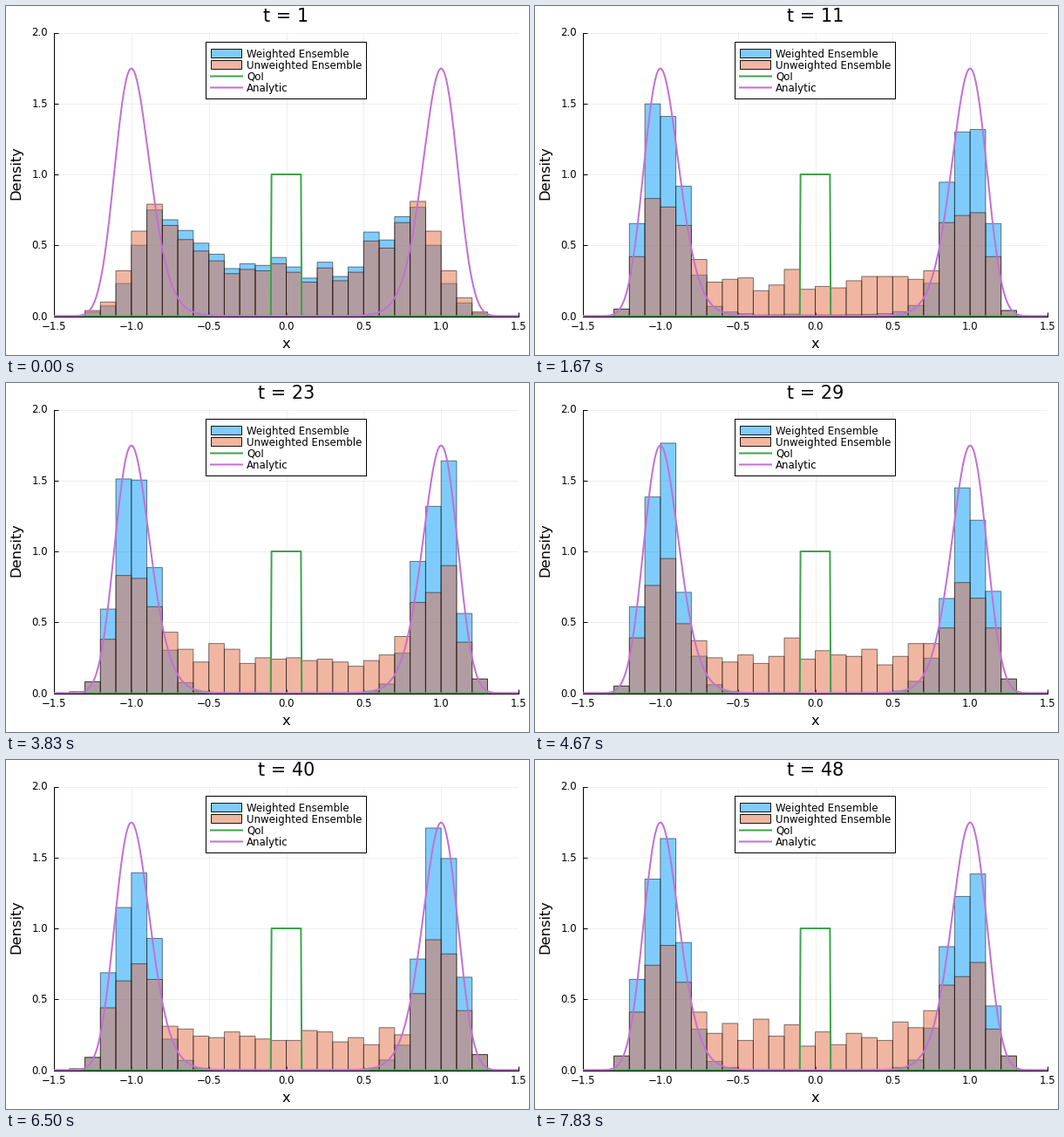
Animation of 600 by 400 pixels, one loop 8000 ms. Source, as a matplotlib script:

```python
import numpy as np
import matplotlib.pyplot as plt
from matplotlib.animation import FuncAnimation
from matplotlib.patches import Rectangle
from matplotlib.lines import Line2D

W, H, DPI = 600, 400, 72          # at 72 dpi one point is one pixel
LEFT, RIGHT, TOP, BOTTOM = 55, 588, 30.5, 355.5
STEPS, STEP_MS = 48, 166.58
RELAX = 2.9                       # steps for the start shape to fade by 1/e
BLUE, ORANGE, GREEN, PURPLE = "#009afa", "#e36f47", "#3da44d", "#c271d2"

plt.rcParams["font.family"] = "DejaVu Sans"


def boltzmann(x):
    return np.exp(-10 * (x**2 - 1)**2)


xs = np.linspace(-1.5, 1.5, 1201)
density = boltzmann(xs) / (boltzmann(xs).sum() * (xs[1] - xs[0]))

BIN = 0.1
edges = np.arange(-14, 14) * BIN
mids = edges + BIN / 2
dist = abs(mids)

# broad cloud at the start; walkers near the centre carry more weight
start_u = np.interp(dist, [.35, .55, .85, .95, 1.05, 1.15, 1.25, 1.35],
                    [.31, .44, .72, .68, .40, .10, .03, 0])
start_w = start_u * np.interp(dist, [.7, 1.05], [1.12, .72])

# long-time shape: the analytic density, or half of it plus a plateau
fine = edges[:, None] + BIN * (np.arange(10) + 0.5) / 10
steady_w = np.interp(fine, xs, density).mean(axis=1)
steady_u = steady_w / 2 + np.interp(dist, [.75, .95, 1.15, 1.35], [.25, .06, .09, .003])


def heights(t):
    """Weighted and unweighted bar heights at step t, from 1000 walkers."""
    fade = np.exp(-(t - 1) / RELAX)
    mean_u = fade * start_u + (1 - fade) * steady_u
    mean_w = fade * start_w + (1 - fade) * steady_w
    u = np.random.default_rng(t).poisson(100 * mean_u) / 100
    return mean_w * u / mean_u.clip(1e-9), u


fig = plt.figure(figsize=(W / DPI, H / DPI), dpi=DPI, facecolor="white")
ax = fig.add_axes([LEFT / W, 1 - BOTTOM / H, (RIGHT - LEFT) / W, (BOTTOM - TOP) / H])
ax.set(xlim=(-1.5, 1.5), ylim=(0, 2))


def label(x, y, text, size, va="baseline", **kw):
    return fig.text(x / W, 1 - y / H, text, fontsize=size, va=va, **kw)


def bars(color, z):
    return ax.bar(edges, np.zeros(len(edges)), BIN, align="edge", zorder=z, snap=False,
                  facecolor=(color, 0.5), edgecolor=(0, 0, 0, 0.5), linewidth=1)


def box(x, y, w, h, **kw):
    fig.add_artist(Rectangle((x, H - y - h), w, h, transform=None, lw=1,
                             snap=False, **kw))


# axes
ticks_x, ticks_y = np.linspace(-1.5, 1.5, 7), np.linspace(0, 2, 5)
ax.set_xticks(ticks_x, [])
ax.set_yticks(ticks_y, [])
ax.set_axisbelow(True)
ax.grid(color="black", alpha=0.1, linewidth=0.6)
ax.tick_params(direction="in", length=5, width=1)
ax.spines[["top", "right"]].set_visible(False)
ax.spines[["left", "bottom"]].set(linewidth=1, zorder=1)

for v in ticks_x:
    x = LEFT + (RIGHT - LEFT) * (v + 1.5) / 3
    label(x, 371, f"{v:.1f}".replace("-", "\u2212"), 11.8, ha="center")
for v in ticks_y:
    y = BOTTOM - (BOTTOM - TOP) * v / 2
    label(48, y + 4, f"{v:.1f}", 11.8, ha="right")

mid_x, mid_y = (LEFT + RIGHT) / 2, (TOP + BOTTOM) / 2
title = label(mid_x, 18, "", 20.7, ha="center")
label(mid_x, 392, "x", 16.3, ha="center")
label(11.5, mid_y - 1.5, "Density", 16.3, ha="center", va="center", rotation=90)

# data
weighted, unweighted = bars(BLUE, 2), bars(ORANGE, 3)
ax.plot([-1.5, -.1, -.095, .095, .1, 1.5], [0, 0, 1, 1, 0, 0],
        color=GREEN, lw=2, zorder=4)
ax.plot(xs, density, color=PURPLE, lw=2, zorder=5)

# legend
box(229.5, 41.5, 184, 65, facecolor="white", edgecolor="black", zorder=6)
entries = [("Weighted Ensemble", BLUE), ("Unweighted Ensemble", ORANGE),
           ("QoI", GREEN), ("Analytic", PURPLE)]
for i, (name, color) in enumerate(entries):
    y = 54.5 + 13 * i
    if "Ensemble" in name:
        box(235.5, y - 5, 35, 10, facecolor=(color, 0.5),
            edgecolor=(0, 0, 0, 0.9), zorder=7)
    else:
        fig.add_artist(Line2D([235, 271], [H - y] * 2, transform=None,
                              color=color, lw=2, snap=False, zorder=7))
    label(276, y + 4.5, name, 11.8, zorder=8)


def draw(i):
    t = i + 1
    title.set_text(f"t = {t}")
    for group, values in zip((weighted, unweighted), heights(t)):
        for bar, v in zip(group, values):
            bar.set_height(v)
            bar.set_visible(v > 0.002)
    return [title, *weighted, *unweighted]


anim = FuncAnimation(fig, draw, frames=STEPS, interval=STEP_MS,
                     repeat=True, repeat_delay=0, blit=False)
plt.show()
```
